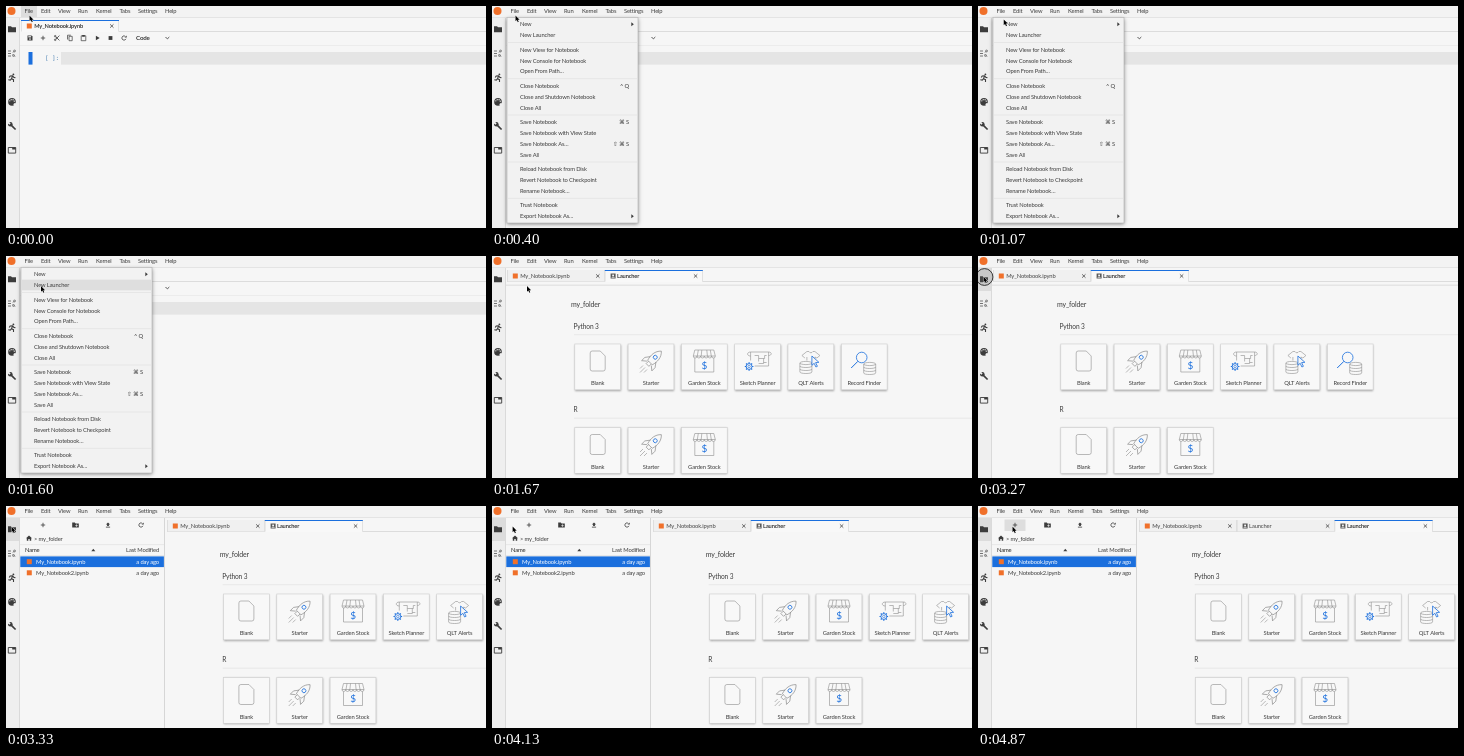
Write an HTML page with a canvas that moves like this. It is 480 px wide and 222 px high and loops after 5790 ms.

```html
<!DOCTYPE html>
<html lang="en">
<head>
<meta charset="utf-8">
<title>Notebook launcher</title>
<style>
html, body { margin: 0; width: 100%; height: 100%; overflow: hidden; background: #f5f5f5; }
canvas { display: block; width: 480px; height: 222px; }
</style>
</head>
<body>
<canvas id="stage"></canvas>
<script>
const W = 480, H = 222, LOOP = 5790;
const BLUE = '#1b6fdd', ORANGE = '#f0702a', INK = '#3c3c3c', GREY = '#8e8e8e', RULE = '#dedede';
const SANS = 'Lato, "Noto Sans", "DejaVu Sans", sans-serif';
const canvas = document.getElementById('stage');
const ctx = canvas.getContext('2d');
const ratio = window.devicePixelRatio || 1;
canvas.width = W * ratio;
canvas.height = H * ratio;

function rect(x, y, w, h, color) {
  ctx.fillStyle = color;
  ctx.fillRect(x, y, w, h);
}

function text(str, x, y, { color = INK, size = 5.8, align = 'left', weight = 400, family = SANS } = {}) {
  ctx.font = `${weight} ${size}px ${family}`;
  ctx.letterSpacing = '-0.15px';
  ctx.textAlign = align;
  ctx.textBaseline = 'alphabetic';
  ctx.fillStyle = color;
  ctx.fillText(str, x, y + size * 0.36);
}

function stroke(d, color = GREY, width = 0.6) {
  ctx.strokeStyle = color;
  ctx.lineWidth = width;
  ctx.stroke(new Path2D(d));
}

function fill(d, color = INK) {
  ctx.fillStyle = color;
  ctx.fill(new Path2D(d));
}

function disc(x, y, r, color) {
  ctx.beginPath();
  ctx.arc(x, y, r, 0, Math.PI * 2);
  ctx.fillStyle = color;
  ctx.fill();
}

function ring(x, y, r, color, width = 0.7) {
  ctx.beginPath();
  ctx.arc(x, y, r, 0, Math.PI * 2);
  ctx.strokeStyle = color;
  ctx.lineWidth = width;
  ctx.stroke();
}

function at(x, y, draw, angle = 0, scale = 1) {
  ctx.save();
  ctx.translate(x, y);
  ctx.rotate(angle);
  ctx.scale(scale, scale);
  draw();
  ctx.restore();
}

const icons = {
  folder: () => fill('M-4-3h3l1 1h4v5h-8z'),
  tree() {
    stroke('M-4-2.5h3M-4 0h3M-4 2.5h3M1-1l2-2M1 1l2 2', '#666', 0.9);
    ring(2.5, -2.5, 1, '#666');
    ring(1.5, 2, 1, '#666');
  },
  runner() {
    disc(1.4, -3.3, 0.9, INK);
    stroke('M.6-1.8L-.5 1l2 1v2.4M-.4.9L-1.7 2.4l-2-.4M-2.8-.2l1-1.5 2.2-.2L2-.3l1.4.2', INK, 1.1);
  },
  palette() {
    disc(0, 0, 3.8, INK);
    for (const a of [-2.7, -1.9, -1.1, -0.3]) disc(2.4 * Math.cos(a), 2.4 * Math.sin(a), 0.65, '#eee');
    disc(3, 2.6, 1.5, '#f0f0f0');
  },
  wrench() {
    stroke('M-.6-.8L3.6 3.4', INK, 1.7);
    disc(-1.7, -1.8, 2.3, INK);
    fill('M-4.6-3.2l1.2-1.4 2 2-1.2 1.2z', '#f0f0f0');
  },
  window() {
    stroke('M-3.7-2.8h7.4v5.6h-7.4z', INK, 0.9);
    rect(0.2, -2.8, 3.5, 2, INK);
  },
  save() {
    fill('M-2.5-2.5h4l1 1v4h-5z');
    rect(-1.7, -1.8, 2.8, 1.2, '#f5f5f5');
    disc(0, 1.1, 0.8, '#f5f5f5');
  },
  plus: () => stroke('M-2.2 0h4.4M0-2.2v4.4', INK, 0.8),
  cut() {
    stroke('M-1.4-1.4L2.4 2.4M-1.4 1.4L2.4-2.4', INK, 0.8);
    ring(-1.8, -1.8, 0.8, INK);
    ring(-1.8, 1.8, 0.8, INK);
  },
  copy: () => stroke('M-1-1.7h3.2v4.4h-3.2zM-2.5 1.5v-4.3h3.4', INK, 0.7),
  paste() {
    stroke('M-2.3-2.2h4.6v4.9h-4.6z', INK, 0.7);
    rect(-1.3, -3, 2.6, 1.7, INK);
  },
  play: () => fill('M-1.6-2.3L2.2 0l-3.8 2.3z'),
  stop: () => rect(-1.9, -1.9, 3.8, 3.8, INK),
  refresh() {
    ctx.beginPath();
    ctx.arc(0, 0, 2.1, 0.4, 5.4);
    ctx.strokeStyle = INK;
    ctx.lineWidth = 0.8;
    ctx.stroke();
    fill('M.6-.4h2.1v-2.2z');
  },
  newFolder() {
    fill('M-3.3-2.4h2.6l.8.8h3.2v4.1h-6.6z');
    stroke('M-.3.6h2.6M1-.7v2.6', '#f5f5f5', 0.6);
  },
  upload() {
    fill('M0-2.6l2.1 2.2h-1.2v1.5h-1.8v-1.5h-1.2z');
    rect(-2.1, 1.7, 4.2, 0.8, INK);
  },
  home: () => fill('M0-2.8l3 2.7h-.8v2.5h-1.5v-1.7h-1.4v1.7h-1.5v-2.5h-.8z'),
  close: () => stroke('M-1.7-1.7l3.4 3.4M-1.7 1.7l3.4-3.4', '#444', 0.8),
  notebook: () => rect(-2.5, -2.5, 5, 5, ORANGE),
  launcher() {
    rect(-2.5, -2.5, 5, 5, '#5a5a5a');
    rect(-0.9, -1.4, 1.8, 1.8, '#f5f5f5');
    rect(-1.5, 1, 3, 0.6, '#f5f5f5');
  },
};

// A stack of three disks hanging from its top centre.
function disks(x, y, rx) {
  const bowl = `c0 2 ${2 * rx} 2 ${2 * rx} 0`;
  stroke(`M${x - rx} ${y}a${rx} 1.6 0 0 1 ${2 * rx} 0a${rx} 1.6 0 0 1 ${-2 * rx} 0v9${bowl}v-9`);
  for (const dy of [3, 6]) stroke(`M${x - rx} ${y + dy}${bowl}`);
}

const cardArt = {
  Blank: () => stroke('M-5.5-10.5h8l5 5v13a2 2 0 0 1-2 2h-11a2 2 0 0 1-2-2v-16a2 2 0 0 1 2-2z'),
  Starter() {
    at(1, -1, () => {
      stroke('M0-11.5c4 3.6 4.4 9 2.8 14h-5.6c-1.6-5-1.2-10.4 2.8-14zM-3.3-1.5l-3 4v4l3.6-3M3.3-1.5l3 4v4l-3.6-3M-1.7 2.5v3h3.4v-3');
      ring(0, -4, 1.7, BLUE);
    }, Math.PI / 4, 1.15);
    stroke('M-6 6l-5 5M-8 4l-3 3M-4 8l-3 3');
  },
  Shop() {
    stroke('M-9.5-11.5h19l1.5 6h-22zM-6-11.5l-1 6M-2.5-11.5l-.6 6M2.5-11.5l.6 6M6-11.5l1 6');
    for (let i = 0; i < 6; i++) stroke(`M${-11 + i * 22 / 6}-5.5a1.83 2 0 0 0 3.67 0`);
    stroke('M-9.5-3.5v14h19v-14');
    text('$', 0, 3.5, { color: BLUE, size: 10, align: 'center' });
  },
  Plan() {
    stroke('M-7-1v-8.5h18v14h-14M11-9.5c3.5 0 3.5 3.5 0 3.5M-7-9.5c-4 0-4 4 0 4M-3-6h4v3h6v-3h2M6-3v5h-5M1-3v3M6 1h3');
    ring(-8.5, 5, 2.9, BLUE, 0.9);
    ring(-8.5, 5, 1.2, BLUE, 0.6);
    for (let i = 0; i < 8; i++) {
      at(-8.5, 5, () => stroke('M3 0h1.3', BLUE, 1.2), i * Math.PI / 4);
    }
  },
  Events() {
    stroke('M-6-3.5l-3-2.5 5-4h2c1 1.7 3 1.7 4 0h2l5 4-3 2.5-2-1v4M-4-4.5v3.5');
    disks(-5, 1.5, 6);
    const arrow = 'M1-5.500l7 6.300-3.300.3 1.800 3.700-1.500.7-1.700-3.700-2.300 2z';
    fill(arrow, '#f6f6f6');
    stroke(arrow, BLUE, 0.8);
  },
  Search() {
    disks(5.5, 2.5, 6);
    disc(-2.5, -4, 5.3, '#f8f8f8');
    ring(-2.5, -4, 5.3, BLUE, 0.8);
    stroke('M-6.300-.200l-6.700 6.700', BLUE, 1);
  },
};

const cards = [
  ['Blank', 'Blank'], ['Starter', 'Starter'], ['Garden Stock', 'Shop'],
  ['Sketch Planner', 'Plan'], ['QLT Alerts', 'Events'], ['Record Finder', 'Search'],
];

const menuGroups = [
  [18.2, ['New', '▸'], ['New Launcher']],
  [43.8, ['New View for Notebook'], ['New Console for Notebook'], ['Open From Path…']],
  [80, ['Close Notebook', '^ Q'], ['Close and Shutdown Notebook'], ['Close All']],
  [116.2, ['Save Notebook', '⌘ S'], ['Save Notebook with View State'], ['Save Notebook As…', '⇧ ⌘ S'], ['Save All']],
  [163.2, ['Reload Notebook from Disk'], ['Revert Notebook to Checkpoint'], ['Rename Notebook…']],
  [199.4, ['Trust Notebook'], ['Export Notebook As…', '▸']],
];

function frameShell(fileHover, folderActive) {
  rect(0, 0, W, H, '#f6f6f6');
  rect(0, 0, W, 12, '#f3f3f3');
  rect(0, 11, W, 0.7, RULE);
  if (fileHover) rect(15, 0, 16, 11, '#dddddd');
  const items = [['File', 18.5], ['Edit', 35], ['View', 52], ['Run', 72], ['Kernel', 90],
    ['Tabs', 113.5], ['Settings', 132], ['Help', 159]];
  for (const [label, x] of items) text(label, x, 5.2);
  rect(0, 12, 13, H, '#efefef');
  if (folderActive) rect(0, 12, 13, 23, '#dcdcdc');
  rect(13, 12, 0.8, H, '#d4d4d4');
  disc(5.5, 5, 4, ORANGE);
  ['folder', 'tree', 'runner', 'palette', 'wrench', 'window']
    .forEach((name, i) => at(6, 23.3 + 24.2 * i, icons[name]));
}

function tabs(left, labels) {
  rect(left, 25.3, W - left, 0.7, '#d2d2d2');
  labels.forEach((label, i) => {
    const x = left + 97.8 * i, active = i === labels.length - 1;
    rect(x, 14, 97.8, active ? 12 : 11.3, active ? '#f8f8f8' : '#f0f0f0');
    rect(x, 14, 0.6, 11.5, '#d2d2d2');
    rect(x + 97.4, 14, 0.6, 11.5, '#d2d2d2');
    if (active) rect(x, 14, 98, 1, BLUE);
    at(x + 8.3, 20, label === 'Launcher' ? icons.launcher : icons.notebook);
    text(label, x + (label === 'Launcher' ? 12.3 : 13.2), 20,
      active ? { color: '#222', weight: 600, size: 5.7 } : { color: '#444' });
    at(x + 90.8, 20, icons.close);
  });
}

function notebook() {
  tabs(15, ['My_Notebook.ipynb']);
  const tools = [['save', 24], ['plus', 37], ['cut', 51], ['copy', 64], ['paste', 77.5],
    ['play', 91.5], ['stop', 104.5], ['refresh', 118]];
  for (const [name, x] of tools) at(x, 32, icons[name]);
  text('Code', 130, 32.2, { size: 6.2, color: '#222', weight: 600 });
  stroke('M159.5 31l1.9 1.9 1.9-1.9', '#444', 0.9);
  rect(14, 39, W, 0.6, '#e6e6e6');
  rect(22.5, 46, 4, 12.6, BLUE);
  rect(55, 46, W, 12.6, '#e5e5e5');
  text('[ ]:', 39, 52, { color: '#4e83b4', size: 6, family: '"DejaVu Sans Mono", monospace' });
}

function launcher(dx) {
  text('my_folder', 79 + dx, 48, { size: 7 });
  [['Python 3', 70.4, 88, 6], ['R', 153.7, 171.5, 3]].forEach(([name, y, top, count]) => {
    text(name, 81.5 + dx, y, { size: 6.6 });
    rect(82 + dx, y + 8, W, 0.8, '#e4e4e4');
    cards.slice(0, count).forEach(([label, art], i) => {
      const x = 82.8 + dx + 53.3 * i;
      ctx.save();
      ctx.shadowColor = 'rgba(0,0,0,.35)';
      ctx.shadowBlur = 2 * ratio;
      ctx.shadowOffsetY = 0.8 * ratio;
      rect(x, top, 45.8, 45.8, '#f8f8f8');
      ctx.restore();
      ctx.strokeStyle = '#cfcfcf';
      ctx.lineWidth = 0.6;
      ctx.strokeRect(x, top, 45.8, 45.8);
      at(x + 22.9, top + 17.5, cardArt[art]);
      text(label, x + 22.9, top + 39.3, { align: 'center' });
    });
  });
}

function fileBrowser(hover, pressed) {
  rect(14, 12, 144.5, H, '#f6f6f6');
  rect(158, 12, 0.8, H, '#cfcfcf');
  if (hover) rect(26.5, 13.5, 21, 11.5, pressed ? '#cfcfcf' : '#dedede');
  [['plus', 37], ['newFolder', 69.5], ['upload', 102], ['refresh', 135]]
    .forEach(([name, x]) => at(x, 19, icons[name]));
  at(23, 32.3, icons.home);
  text('> my_folder', 28, 32.5);
  rect(14, 38.5, 144, 0.6, RULE);
  text('Name', 19, 44.2, { color: '#222' });
  fill('M85.3 45.2l2-2.4 2 2.4z');
  text('Last Modified', 153, 44.2, { align: 'right' });
  rect(14, 49, 144, 0.6, RULE);
  rect(14.3, 50.4, 143.6, 10.7, BLUE);
  [['My_Notebook.ipynb', 55.7, '#fff'], ['My_Notebook2.ipynb', 66.8, INK]].forEach(([name, y, color]) => {
    at(23.3, y, icons.notebook);
    text(name, 30, y, { color });
    text('a day ago', 153, y, { color, align: 'right' });
  });
}

function fileMenu(cursorY) {
  rect(15, 0, 16, 12, '#f3f3f3');
  ctx.save();
  ctx.shadowColor = 'rgba(0,0,0,.5)';
  ctx.shadowBlur = 4 * ratio;
  ctx.shadowOffsetY = 1.2 * ratio;
  rect(15, 11.5, 131, 205.5, '#f2f2f2');
  ctx.restore();
  ctx.strokeStyle = '#b9b9b9';
  ctx.lineWidth = 0.7;
  ctx.strokeRect(15, 11.5, 131, 205.5);
  text('File', 18.5, 5.2);
  for (const [top, ...items] of menuGroups) {
    if (top > 20) rect(15.5, top - 7.5, 130, 0.6, '#dfdfdf');
    items.forEach(([label, hint], i) => {
      const y = top + 10.8 * i;
      if (cursorY > 15 && Math.abs(cursorY + 0.5 - y) < 5.4) rect(15.5, y - 5.4, 130.2, 10.8, '#dedede');
      text(label, 28, y);
      if (hint === '▸') fill(`M139.3 ${y - 2}l2.5 2-2.5 2z`);
      else if (hint) text(hint, 137, y, { align: 'right' });
    });
  }
}

// Each move: start, number of steps, step length, end point, ease-out power.
const moves = [
  [1070, 8, 75.7, 35, 30, 1.6],
  [2600, 3, 65, 5.5, 20.5, 1.5],
  [4130, 5, 67.5, 34.5, 20.5, 3.3],
];

function cursorAt(t) {
  let x = 23.5, y = 9.5;
  for (const [start, count, step, endX, endY, power] of moves) {
    if (t < start) break;
    const p = Math.min(1, (Math.floor((t - start) / step + 0.01) + 1) / count);
    const k = 1 - (1 - p) ** power;
    x += (endX - x) * k;
    y += (endY - y) * k;
  }
  return [x, y];
}

function pointer(x, y, clicking) {
  if (clicking) {
    disc(x + 1, y + 0.5, 8.4, 'rgba(120,120,120,.2)');
    ring(x + 1, y + 0.5, 8.4, '#222', 0.9);
  }
  at(x, y, () => {
    const arrow = 'M0 0v6.5l1.5-1.4 1.1 2.5 1.1-.5-1.1-2.4h2.1z';
    stroke(arrow, '#fff', 1);
    fill(arrow, '#000');
  }, 0, 0.88);
}

function draw(t) {
  ctx.setTransform(ratio, 0, 0, ratio, 0, 0);
  const [x, y] = cursorAt(t);
  const within = (from, to) => t >= from && t < to;
  frameShell(t < 400, t >= 2665);
  if (t < 1670) {
    notebook();
    if (t >= 400) fileMenu(y);
  } else if (t < 3330) {
    tabs(15, ['My_Notebook.ipynb', 'Launcher']);
    rect(14, 28.7, W, 0.8, '#d6d6d6');
    launcher(0);
  } else {
    const names = ['My_Notebook.ipynb', 'Launcher'];
    if (t >= 4870) names.push('Launcher');
    tabs(161, names);
    launcher(134.7);
    fileBrowser(x > 26, within(4800, 4870));
  }
  pointer(x, y, within(330, 400) || within(3270, 3330) || within(4800, 4870));
}

const began = performance.now();
function tick() {
  draw((performance.now() - began) % LOOP);
  requestAnimationFrame(tick);
}
tick();
</script>
</body>
</html>
```
